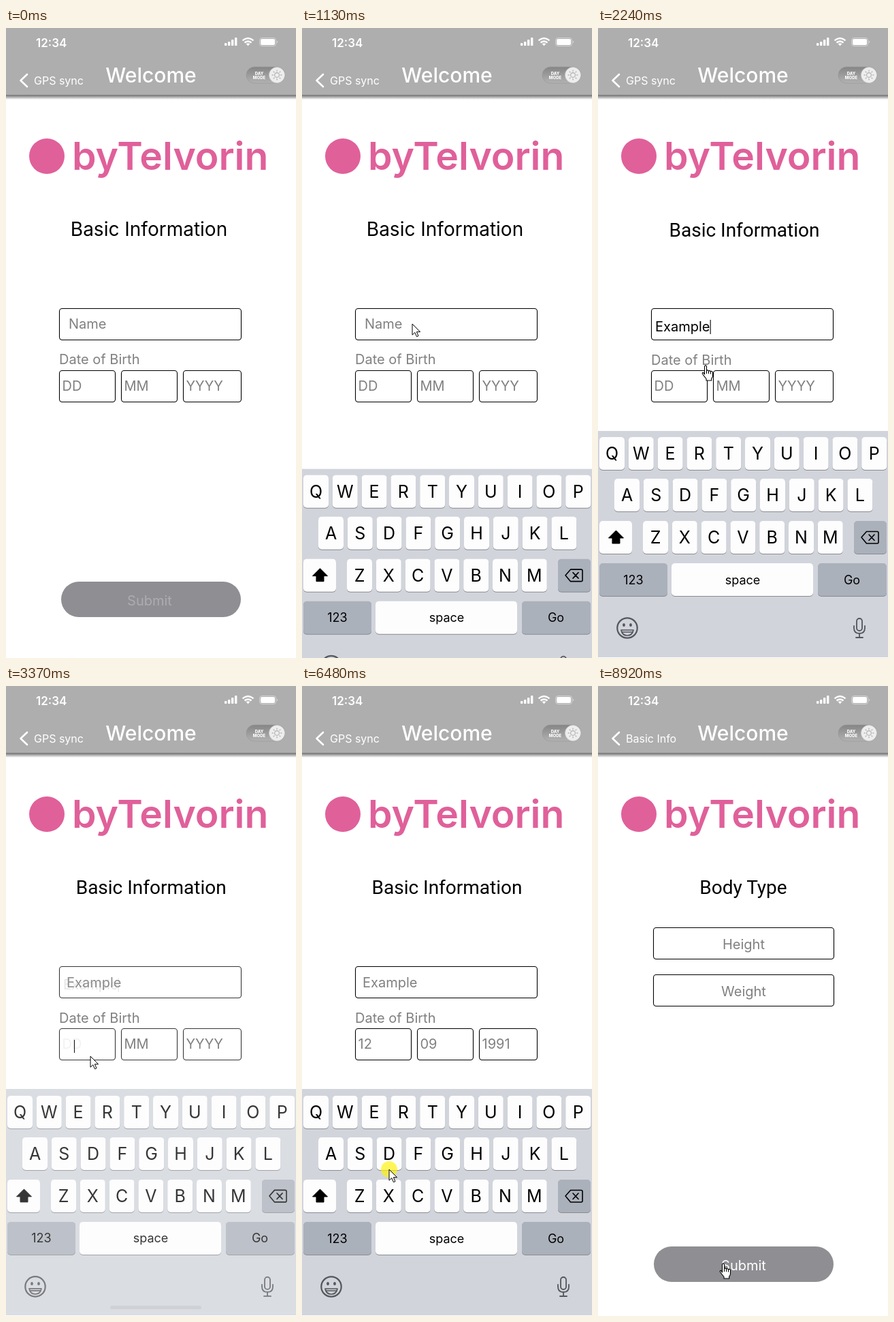
Recreate the animation shown at these times as an HTML page. Size 426 by 924 pixels, loop 8.99 s.

```html
<!DOCTYPE html>
<html lang="en">
<head>
<meta charset="utf-8">
<title>Sign-up flow</title>
<style>
  html, body { margin: 0; width: 100%; height: 100%; overflow: hidden; background: #fff; }
  svg { display: block; width: 100vw; height: 100vh; }
  text { font-family: Inter, "Open Sans", sans-serif; }
  .field { fill: none; stroke: #000; stroke-width: 1.1; }
  .hint { font-size: 20px; fill: #808080; }
  .caret { stroke: #000; stroke-width: 1.1; }
  .key { font-size: 25px; text-anchor: middle; }
  .word { font-size: 18px; text-anchor: middle; }
  .mid { text-anchor: middle; }
  .roboto { font-family: Roboto, sans-serif; }
</style>
</head>
<body>
<svg viewBox="0 0 426 924" preserveAspectRatio="none">
  <defs>
    <linearGradient id="shade" x2="0" y2="1">
      <stop offset="0" stop-color="#686868"/>
      <stop offset=".35" stop-color="#8d8d8d"/>
      <stop offset="1" stop-color="#fff"/>
    </linearGradient>
    <linearGradient id="pill" x2="0" y2="1">
      <stop offset="0" stop-color="#858585"/>
      <stop offset="1" stop-color="#b2b2b2"/>
    </linearGradient>
  </defs>
  <rect width="426" height="924" fill="#fff"/>

  <rect y="97" width="426" height="8" fill="url(#shade)"/>
  <rect width="426" height="98" fill="#aeaeae"/>
  <g fill="#fff">
    <text x="44" y="28" font-size="17" font-weight="600">12:34</text>
    <g id="bars"></g>
    <g fill="none" stroke="#fff" stroke-width="2.3">
      <path d="M347.5 18.4Q355.500 11.600 363.500 18.400M350.500 21.500Q355.500 17.400 360.500 21.500"/>
    </g>
    <path d="M352.700 23.300Q355.500 21.100 358.300 23.300L355.500 26.200Z"/>
    <rect x="372.500" y="14.500" width="24" height="12" rx="3.500" fill="none" stroke="#fff" stroke-opacity=".45"/>
    <rect x="374" y="16" width="21" height="9" rx="2"/>
    <path d="M398 18.500Q400 20.500 398 22.500Z" opacity=".6"/>
    <path d="M31 68L21.500 77L31 86" fill="none" stroke="#fff" stroke-width="2.600" stroke-linecap="round" stroke-linejoin="round"/>
    <text id="back" x="41" y="83" font-size="16"></text>
    <text x="213" y="80" font-size="30" font-weight="500" class="mid">Welcome</text>
  </g>

  <rect x="353" y="57" width="57" height="24" rx="12" fill="url(#pill)" stroke="#999" stroke-width=".7"/>
  <g class="mid" fill="#fff" font-size="6" font-weight="800">
    <text x="372" y="68.500">DAY</text>
    <text x="372" y="74.500">MODE</text>
  </g>
  <circle cx="398" cy="69" r="11.500" fill="#eee" stroke="#ccc" stroke-width=".8"/>
  <g id="sun" stroke="#aaa" stroke-width="1.100" fill="none" transform="translate(398 69)"><circle r="3.400"/></g>

  <circle cx="60" cy="188" r="26" fill="#e0609a"/>
  <text x="97" y="208" font-size="57" font-weight="600" fill="#e0609a">byTelvorin</text>

  <text id="title" class="mid" font-size="28"></text>

  <g id="form">
    <g id="boxes"></g>
    <text id="label" class="hint" x="78">Date of Birth</text>
    <text id="name" class="hint" x="92" y="441">Name</text>
    <g id="typing">
      <text id="typed" x="84" y="445" font-size="20"></text>
      <path id="typeCaret" class="caret"/>
    </g>
    <text id="saved" class="hint">Example</text>
    <text id="dd" class="hint" x="82.500" y="532">DD</text>
    <text id="day" class="hint" x="82.500" y="532">12</text>
    <text id="mm" class="hint" x="173.500" y="532">MM</text>
    <text id="month" class="hint" x="173.500" y="532">09</text>
    <text id="yyyy" class="hint" x="264.500" y="532">YYYY</text>
    <text id="year" class="hint" x="264.500" y="532">1991</text>
    <path id="ddCaret" class="caret" d="M100.500 519V538"/>
    <path id="mmCaret" class="caret" d="M184.500 519V538"/>
    <path id="yyCaret" class="caret" d="M276.500 519V538"/>
  </g>

  <g id="body">
    <rect class="field" x="81.500" y="354.500" width="265" height="46" rx="4"/>
    <rect class="field" x="81.500" y="423.500" width="265" height="46" rx="4"/>
    <text class="hint mid" x="214" y="386">Height</text>
    <text class="hint mid" x="214" y="455">Weight</text>
  </g>

  <g id="submit">
    <rect x="81" y="812" width="264" height="52" rx="26" fill="#8e8e93"/>
    <text id="submitText" class="mid" x="211" y="847" font-size="20">Submit</text>
  </g>

  <g id="board">
    <rect id="under" width="426" height="333" fill="#fff"/>
    <rect id="homeBar" x="153" y="318" width="134" height="5" rx="2.500"/>
    <g id="panel">
      <rect width="426" height="332" fill="#d1d4db"/>
      <g id="keys"></g>
    </g>
  </g>

  <g id="pointer">
    <circle id="click" r="12" fill="#fff200" opacity=".65"/>
    <path id="arrow" d="M0 0V16.200L3.800 12.600L6.500 18.700L9 17.600L6.400 11.700H11.600Z" fill="#fff" stroke="#000" stroke-linejoin="round"/>
    <path id="hand" transform="translate(-5.500 0)" fill="#fff" stroke="#000" stroke-width="1.100" stroke-linejoin="round"
      d="M4 14V2.200Q5.500 -.5 7 2.200V8.500Q8.500 7 10 9Q11.500 7.800 13 9.800Q14.500 8.700 16 10.800V16Q16 18.500 14.200 20V23H6.500V20.500Q4 17.500 1 13.500Q.2 11.200 2.200 11.400ZM7 8.500V13M10 9V13M13 9.800V13.500"/>
  </g>
</svg>
<script>
const LOOP = 8990;
const el = id => document.getElementById(id);
const set = (id, attrs) => {
  for (const k in attrs) el(id).setAttribute(k, attrs[k]);
};
const fade = (id, a) => set(id, { opacity: a });
const show = (id, on) => { el(id).style.display = on ? '' : 'none'; };
const between = (t, a, b) => t >= a && t < b;
const unit = (t, a, b) => Math.min(1, Math.max(0, (t - a) / (b - a)));
const easeOut = (t, a, b) => 1 - (1 - unit(t, a, b)) ** 2;
const mix = (a, b, p) => a + (b - a) * p;

function build() {
  el('bars').innerHTML = [4, 6, 9, 12].map((h, i) =>
    `<rect x="${321 + 5 * i}" y="${26 - h}" width="3.400" height="${h}" rx="1"/>`).join('');

  for (let i = 0; i < 8; i++)
    el('sun').innerHTML += `<path d="M0 -5V-7.500" transform="rotate(${45 * i})"/>`;

  el('boxes').innerHTML = [[78, 411, 268], [78, 502, 83], [169, 502, 83], [260, 502, 86]].map(([x, y, w]) =>
    `<rect class="field" x="${x + .5}" y="${y + .5}" width="${w - 1}" height="46" rx="4"/>`).join('');

  const cap = (x, y, w, fill = '#fdfdfe') =>
    `<rect x="${x}" y="${y + 1}" width="${w}" height="48" rx="5" fill="#898b90"/>` +
    `<rect x="${x}" y="${y}" width="${w}" height="48" rx="5" fill="${fill}"/>`;
  const word = (s, x) => `<text class="word" x="${x}" y="224.500">${s}</text>`;
  const dark = '#abb1bb';
  let out = '';
  [['QWERTYUIOP', 2, 9], ['ASDFGHJKL', 24, 70], ['ZXCVBNM', 66, 132]].forEach(([row, left, y]) => {
    [...row].forEach((c, i) => {
      const x = left + 42.8 * i;
      out += cap(x, y, 37) + `<text class="key" x="${x + 18.5}" y="${y + 33}">${c}</text>`;
    });
  });
  out += cap(2, 132, 48) + cap(376, 132, 48, dark);
  out += cap(2, 194, 100, dark) + cap(108, 194, 208) + cap(323, 194, 101, dark);
  out += word('123', 52) + word('space', 212.5) + word('Go', 373);
  out += '<path d="M26.500 146L37.500 157H32V165H21V157H15.500Z" stroke="#000" stroke-linejoin="round"/>';
  out += `<g fill="none" stroke="#000" stroke-width="1.600" stroke-linejoin="round" stroke-linecap="round">
    <path d="M387 156L394.500 147.500H410Q412 147.500 412 149.500V163Q412 165 410 165H394.500ZM398 152L406 160.500M406 152L398 160.500"/></g>`;
  out += `<g fill="none" stroke="#54565b" stroke-width="2.200" stroke-linecap="round" stroke-linejoin="round">
    <circle cx="43" cy="289" r="14.700"/>
    <path d="M34 292H52Q50.500 300 43 300Q35.500 300 34 292ZM36 295H50" stroke-width="1.700"/>
    <rect x="380" y="275" width="8" height="18" rx="4" stroke-width="1.800"/>
    <path d="M376 286V289Q376 297 384 297Q392 297 392 289V286M384 297V303M379 303H389" stroke-width="1.800"/></g>
    <g fill="#54565b"><ellipse cx="38" cy="284.500" rx="1.900" ry="2.500"/><ellipse cx="48" cy="284.500" rx="1.900" ry="2.500"/></g>`;
  el('keys').innerHTML = out;
}

// time, x, y of the pointer tip
const PATH = [
  [450, 180, 845], [800, 162, 434], [1340, 162, 434], [1800, 160, 455], [2170, 158, 470],
  [2240, 158, 494], [2500, 150, 568], [2900, 131, 535], [3230, 131, 535], [3370, 124, 543],
  [4060, 128, 709], [6950, 128, 709], [7860, 182, 840], [8070, 182, 845],
  [8600, 182, 845], [8660, 184, 846]
];
const HAND = [[2100, 2450], [2900, 3230], [7930, 8660], [8920, LOOP]];
const CLICKS = [[800, 930], [3080, 3200], [6480, 6610], [8530, 8660]];
const within = (t, spans) => spans.some(([a, b]) => between(t, a, b));

function tip(t) {
  const next = PATH.findIndex(p => p[0] > t);
  if (next < 0) return PATH[PATH.length - 1].slice(1);
  if (next === 0) return PATH[0].slice(1);
  const a = PATH[next - 1], b = PATH[next];
  const u = unit(t, a[0], b[0]);
  const p = u * u * (3 - 2 * u);
  return [mix(a[1], b[1], p), mix(a[2], b[2], p)];
}

function draw(t) {
  const second = t >= 8660;
  const typingMode = between(t, 1270, 6610);
  const toDay = easeOut(t, 3200, 3450);
  const toMonth = easeOut(t, 4100, 4270);
  const toYear = easeOut(t, 4430, 4810);
  const done = easeOut(t, 5110, 5420);
  const u = unit(t, 3200, 3450);
  const cover = 1 - u * (1 - u);

  el('back').textContent = second ? 'Basic Info' : 'GPS sync';
  const title = el('title');
  title.textContent = second ? 'Body Type' : 'Basic Information';
  title.classList.toggle('roboto', second || typingMode);
  set('title', {
    x: second ? 213.5 : typingMode ? mix(215, 213, toDay) : 210,
    y: typingMode ? mix(306, 305, toDay) : 305
  });

  show('form', !second);
  show('body', second);
  fade('boxes', cover);
  const shift = toYear * (1 - done);
  set('label', { y: typingMode ? 493.5 - .5 * shift : 493 });
  show('name', t < 1270);

  const count = Math.max(0, Math.min(7, Math.floor((t - 1290) / 115)));
  show('typing', between(t, 1270, 3450));
  fade('typing', 1 - toDay);
  el('typed').textContent = 'Example'.slice(0, count);
  const end = count && t < 3450 ? 84 + el('typed').getComputedTextLength() : 84;
  set('typeCaret', { d: `M${end + .7} 428V449` });
  set('saved', { x: 89 + 2 * shift, y: 442 - shift, opacity: toDay });

  fade('dd', 1 - toDay);
  fade('ddCaret', toDay * (1 - toMonth));
  fade('day', toMonth);
  fade('mm', 1 - toMonth);
  fade('mmCaret', toMonth * (1 - toYear));
  fade('month', toYear);
  fade('yyyy', 1 - toYear);
  fade('yyCaret', toYear * (1 - done));
  fade('year', done);

  set('submit', { transform: second ? 'translate(1 10)' : '' });
  set('submitText', { fill: t < 6610 ? '#adadb0' : '#fff', x: second ? 213 : 211 });

  show('board', between(t, 930, 6610));
  set('board', { transform: `translate(0 ${mix(924, 591, easeOut(t, 930, 1270))})` });
  fade('panel', cover);
  fade('homeBar', toDay < 1 ? 1 - cover : 0);
  set('keys', { transform: `translate(0 ${toDay})` });

  show('pointer', t >= 450);
  set('pointer', { transform: `translate(${tip(t)})` });
  const hand = within(t, HAND);
  show('hand', hand);
  show('arrow', !hand);
  show('click', within(t, CLICKS));
}

build();
const start = performance.now();
function tick() {
  draw((performance.now() - start) % LOOP);
  requestAnimationFrame(tick);
}
tick();
</script>
</body>
</html>
```
